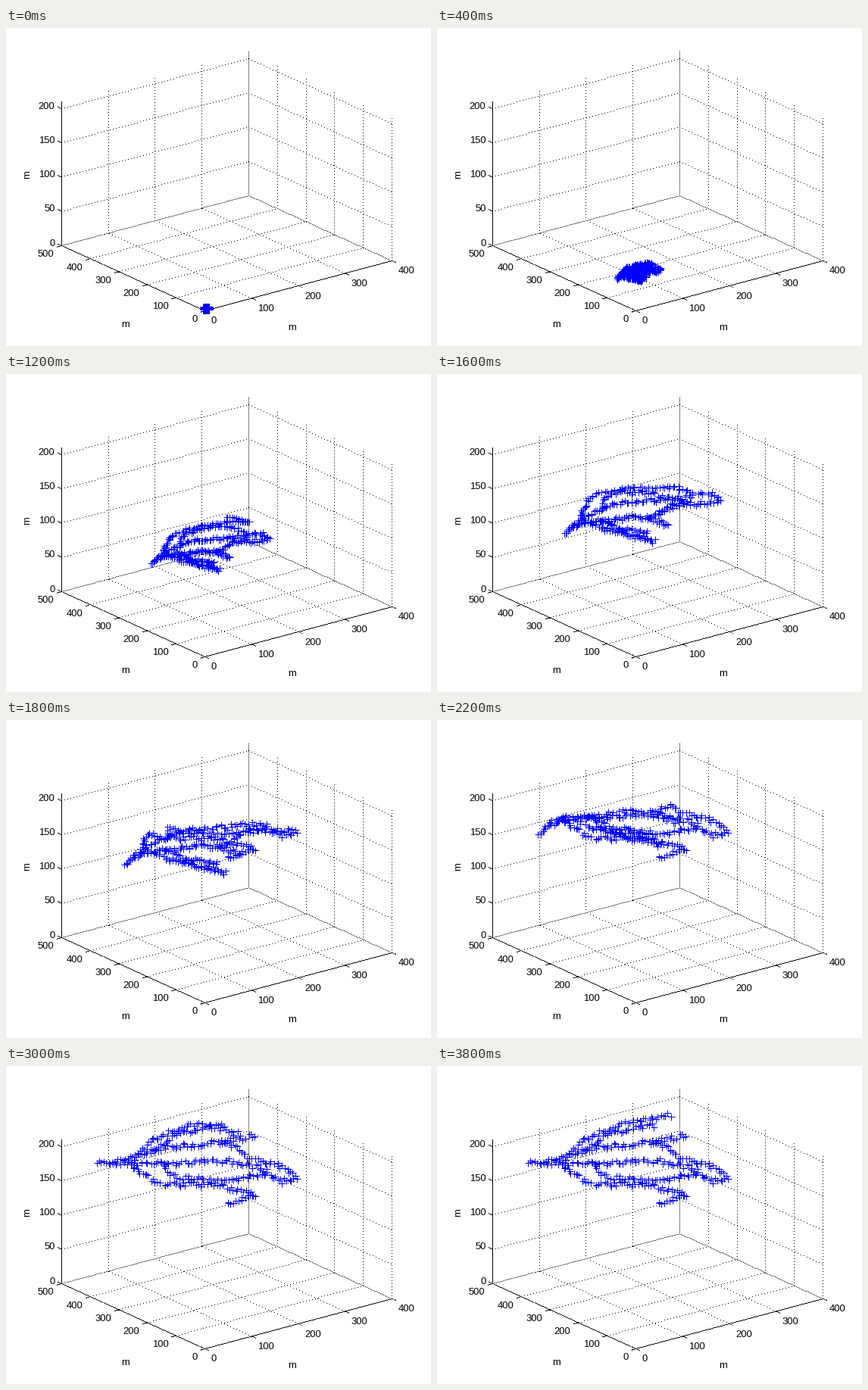
These frames come from a looping animation (561x420 px, 4 s). A matplotlib script:

```python
import numpy as np
import matplotlib.pyplot as plt
from matplotlib.animation import FuncAnimation

W, H, DPI = 561, 420, 48
PX = 72 / DPI                      # points per pixel
FRAMES, STEP_MS = 20, 200

plt.rcParams.update({
    "font.family": "Liberation Sans",
    "font.size": 13 * PX,
    "toolbar": "None",
})

# Projection of the 400 x 500 x 210 m box onto the stage
XM, YM, ZM = 400, 500, 210
ORIGIN = np.array([262.0, 374.0])
EX = np.array([247.0, -66.0]) / XM
EY = np.array([-189.0, -86.0]) / YM
EZ = np.array([0.0, -190.0]) / ZM


def project(x, y, z=0):
    return ORIGIN + x * EX + y * EY + z * EZ


fig = plt.figure(figsize=(W / DPI, H / DPI), dpi=DPI, facecolor="white")
ax = fig.add_axes([0, 0, 1, 1])
ax.set_xlim(-0.5, W - 0.5)
ax.set_ylim(H - 0.5, -0.5)
ax.axis("off")


def line(p, q, step=1):
    """One-pixel line; a larger step leaves gaps and gives dots."""
    p, q = np.asarray(p), np.asarray(q)
    length = int(np.abs(q - p).max())
    t = np.arange(0, length + 1, step)[:, None] / length
    x, y = np.round(p + (q - p) * t).T
    ax.plot(x, y, ",", color="black", antialiased=False)


def label(x, y, s, ha="center", va="baseline", **kw):
    ax.text(round(x), round(y), str(s), ha=ha, va=va, color="black", **kw)


DOT, DENSE = 4, 2


def draw_grid():
    for x in range(0, XM, 100):
        line(project(x, YM), project(x, YM, ZM), DOT)
        if x:
            line(project(x, 0), project(x, YM), DOT)
    for y in range(0, YM, 100):
        line(project(XM, y), project(XM, y, ZM), DOT)
        if y:
            line(project(0, y), project(XM, y), DOT)
    for z in range(50, ZM, 50):
        line(project(0, YM, z), project(XM, YM, z), DOT)
        line(project(XM, YM, z), project(XM, 0, z), DOT)
    corner = project(XM, YM)
    for end in (project(0, YM), project(XM, 0), project(XM, YM, ZM)):
        line(corner, end, DENSE)


def draw_axes():
    line(project(0, 0), project(XM, 0))
    line(project(0, 0), project(0, YM))
    line(project(0, YM), project(0, YM, ZM))
    for x in range(0, XM + 1, 100):
        p = project(x, 0)
        line(p, p + (5, 2.3))
        label(p[0] + 8, p[1] + 16.5, x, "left")
    for y in range(0, YM + 1, 100):
        p = project(0, y)
        line(p, p + (-6, 1.6))
        label(p[0] - 10, p[1] + 14.5, y, "right")
    for z in range(0, ZM, 50):
        p = project(0, YM, z)
        line(p, p + (-5, -2.3))
        label(64, p[1] - 0.5, z, "right")
    label(157, 395, "m")
    label(377, 399, "m")
    label(28, 193, "m", va="center", rotation=90)


# Key points of the formation's strokes, in stage pixels
STROKES = [
    [(118, 128), (165, 127), (192, 97), (245, 76), (310, 63)],
    [(192, 112), (225, 88), (286, 78)],
    [(140, 126), (205, 108), (290, 99), (330, 91)],
    [(285, 97), (320, 120), (357, 129), (384, 148)],
    [(300, 127), (335, 134), (363, 152), (384, 149)],
    [(165, 128), (205, 129), (300, 124)],
    [(165, 130), (200, 155), (275, 157), (328, 170), (290, 183)],
    [(205, 128), (222, 146), (290, 152), (345, 140)],
]


def sample(stroke, gap=3.2):
    pts = np.array(stroke, float)
    dist = np.r_[0, np.cumsum(np.hypot(*np.diff(pts, axis=0).T))]
    s = np.arange(0, dist[-1], gap)
    return np.c_[np.interp(s, dist, pts[:, 0]), np.interp(s, dist, pts[:, 1])]


rng = np.random.default_rng(4)
goal = np.vstack([sample(s) for s in STROKES])
goal += rng.uniform(-1, 1, goal.shape) * (2, 3.2)
gx, gy = goal.T

# Flight time in frames grows with height and distance from the middle
rise = 183 - gy
flight = 6.2 + 0.035 * rise + 0.00042 * rise**2 + 0.000095 * (gx - 290)**2

# Launch pad: a small disc, ordered left to right like the formation
start = np.c_[264 + np.clip((gx - 250) * 0.035, -4, 4),
              370 + rng.uniform(-2.4, 2.4, len(goal))]

draw_grid()
draw_axes()
swarm, = ax.plot([], [], "+", color="blue", ms=9 * PX, mew=PX,
                 antialiased=False, zorder=5)


def update(i):
    t = np.minimum(1, i / flight)[:, None]
    swarm.set_data(*np.round(start + (goal - start) * t).T)
    return swarm,


anim = FuncAnimation(fig, update, frames=FRAMES, interval=STEP_MS,
                     repeat=True, repeat_delay=0, blit=False)
plt.show()
```
